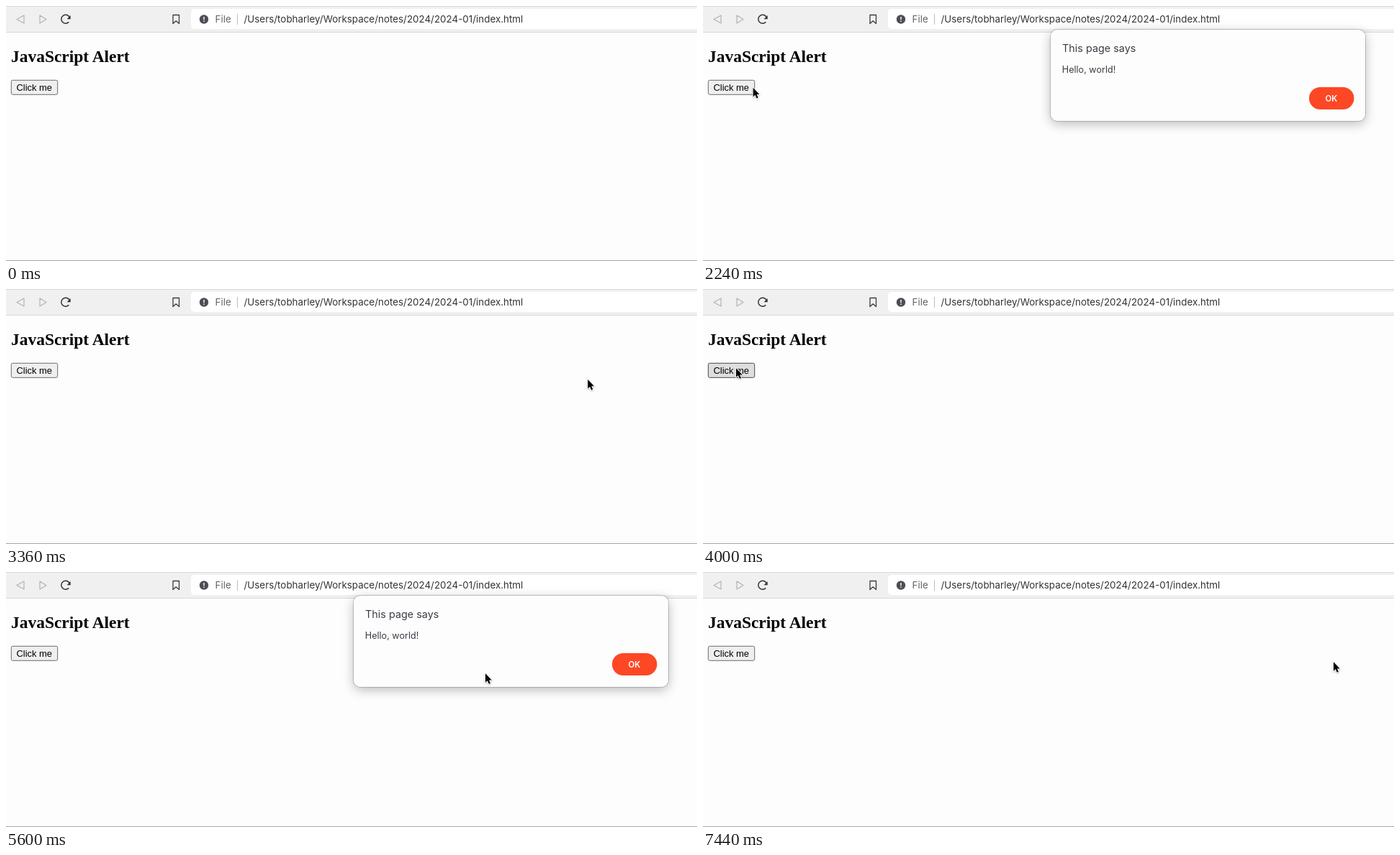
Animation of 960 by 355 pixels, one loop 7.52 s. Source, as an HTML page:

```html
<!DOCTYPE html>
<html lang="en">
<head>
<meta charset="utf-8">
<title>JavaScript Alert</title>
<style>
  html, body { margin: 0; width: 100%; height: 100%; overflow: hidden; background: #fdfdfd; }
  svg { position: absolute; left: 0; top: 0; display: block; overflow: visible; }
  text { white-space: pre; }
  .ui { font-family: Inter, Roboto, sans-serif; }
  #button rect { fill: #efefef; stroke: #6b6b6b; }
  #button.hover rect { fill: #dedede; stroke: #484848; }
  #button.press rect { fill: #f3f3f3; stroke: #808080; }
  #dialog {
    position: absolute; left: 483px; top: 33px; width: 437px; height: 127px;
    border-radius: 9px; background: #fdfdfd; transform-origin: 50% 100%;
    box-shadow: 0 0 0 1px rgba(0,0,0,.17), 0 4px 16px rgba(0,0,0,.27);
  }
  #ok rect { fill: #fd4725; }
  #ok.hover rect { fill: #f9502f; }
  #ok.press rect { fill: #ec5a3b; }
  #ok.press text { fill: #fbe0d9; }
  #cursor { filter: drop-shadow(0 1px 1px rgba(0,0,0,.25)); }
</style>
</head>
<body>
<svg width="960" height="355" viewBox="0 0 960 355">
  <rect width="960" height="355" fill="#fdfdfd"/>
  <rect width="960" height="37" fill="#f0f0f0"/>
  <path d="M0 .5H960M0 36.5H960" stroke="#d9d9d9"/>
  <path d="M0 354.5H960" stroke="#a6a6a6"/>
  <rect x="257" y="4" width="720" height="28" rx="5" fill="#fff"/>
  <g fill="none" stroke-width="1.2" stroke-linejoin="round">
    <path d="M25 13V24L15 18.5ZM47 13V24L56 18.5Z" stroke="#b3b3b3"/>
    <path d="M232 12.5H240.5V24.5L236.2 20.8L232 24.5Z" stroke="#3c3c3c" stroke-width="1.3"/>
    <path d="M87.3 22.2A6 6 0 1 1 88.4 16" stroke="#333" stroke-width="1.5"/>
  </g>
  <path d="M89.7 13V18.2H84.6Z" fill="#333"/>
  <circle cx="275" cy="18.5" r="6.2" fill="#4b4e54"/>
  <path d="M275 15V19.2M275 20.6V22" stroke="#fff" stroke-width="1.4"/>
  <path d="M321.5 11V26" stroke="#bdbdbd"/>
  <g class="ui" font-size="13.4">
    <text x="290.5" y="23.3" fill="#666">File</text>
    <text x="330.5" y="23.3" fill="#333">/Users/tobharley/Workspace/notes/2024/2024-01/index.html</text>
  </g>
  <text x="7" y="77.5" font-family="'Liberation Serif', Times, serif" font-weight="700" font-size="23.45">JavaScript Alert</text>
  <g id="button">
    <rect x="7.3" y="103.3" width="64.4" height="20" rx="2.2"/>
    <text x="14.5" y="117.6" font-family="'Liberation Sans', Arial, sans-serif" font-size="12.93">Click me</text>
  </g>
</svg>

<div id="dialog">
  <svg class="ui" width="437" height="127" viewBox="483 33 437 127">
    <text x="499" y="64.4" font-size="14.4" fill="#3b3d45">This page says</text>
    <text x="498.8" y="92.6" font-size="12.6" fill="#3b3d45">Hello, world!</text>
    <g id="ok">
      <rect x="842" y="113" width="62.5" height="31" rx="15.5"/>
      <text x="873" y="132.7" font-size="11.5" font-weight="600" text-anchor="middle" fill="#fff">OK</text>
    </g>
  </svg>
</div>

<svg id="cursor" width="14" height="20">
  <path d="M1 1.2V13.8L3.8 11.2L5.9 15.8L8 14.9L6 10.4H9.8Z" stroke="#fff" stroke-width="1.6" paint-order="stroke"/>
</svg>

<script>
const LOOP = 7520, TICK = 80, OPENING = 320, CLOSING = 190, STALE_HOVER = 240;
const $ = id => document.getElementById(id);
const button = $('button'), dialog = $('dialog'), ok = $('ok'), cursor = $('cursor');

const buttonBox = { x: 7, y: 103, w: 65, h: 21 };
const okBox = { x: 842, y: 113, w: 62, h: 31 };

// The pointer enters from the left edge, then glides from stop to stop
const entry = { x: 0, y: 139, time: 640 };
const moves = [
  { from: 640, to: 720, x: 26, y: 112 },
  { from: 880, to: 1280, x: 33, y: 112 },
  { from: 2160, to: 2800, x: 862, y: 126 },
  { from: 3240, to: 4000, x: 45, y: 109 },
  { from: 4800, to: 5200, x: 341, y: 160 },
  { from: 5280, to: 5440, x: 665, y: 140 },
  { from: 5600, to: 6320, x: 875, y: 124 }
];

// Clicks that open and close the alert
const alerts = [{ open: 1520, close: 3040 }, { open: 4320, close: 6400 }];

const clamp = v => Math.min(1, Math.max(0, v));
const progress = (t, from, length) => clamp((t - from) / length);
const smooth = p => p * p * (3 - 2 * p);
const easeOut = p => 1 - (1 - p) ** 2;
const inside = (p, b) => p.x >= b.x && p.x <= b.x + b.w && p.y >= b.y && p.y <= b.y + b.h;
const within = (t, from, length) => t >= from && t <= from + length;

function pointerAt(t) {
  return moves.reduce((p, m) => {
    const f = smooth(progress(t, m.from, m.to - m.from));
    return { x: p.x + (m.x - p.x) * f, y: p.y + (m.y - p.y) * f };
  }, entry);
}

const alertAlpha = (a, t) =>
  easeOut(progress(t, a.open, OPENING)) - progress(t, a.close, CLOSING);

function stateOf(pressed, hovered) {
  return pressed ? 'press' : hovered ? 'hover' : '';
}

function draw(now) {
  const t = Math.floor((now % LOOP) / TICK) * TICK;
  const pointer = pointerAt(t);
  cursor.style.visibility = t < entry.time ? 'hidden' : 'visible';
  cursor.style.transform = `translate(${pointer.x}px, ${pointer.y}px)`;

  // The dialog tilts back and lifts as it fades; its button fades faster
  const alpha = clamp(Math.max(...alerts.map(a => alertAlpha(a, t))));
  const tilt = (1 - alpha) / .43;
  dialog.style.opacity = alpha;
  ok.style.opacity = alpha;
  dialog.style.transform =
    `matrix3d(1,0,0,0, 0,${1 + .046 * tilt},0,${(-.0003 * tilt).toFixed(7)}, 0,0,1,0, 0,${-10 * tilt},0,1)`;

  // The page button regains a stale hover just after the alert closes
  const stale = alerts.some(a => within(t, a.close + TICK, STALE_HOVER - TICK));
  const opening = alerts.some(a => t === a.open);
  const closing = alerts.some(a => within(t, a.close - TICK, TICK));
  button.setAttribute('class', stateOf(opening, stale || (!alpha && inside(pointer, buttonBox))));
  ok.setAttribute('class', stateOf(closing, alpha === 1 && inside(pointer, okBox)));
}

const start = performance.now();
function loop() {
  draw(performance.now() - start);
  requestAnimationFrame(loop);
}
loop();
</script>
</body>
</html>
```
